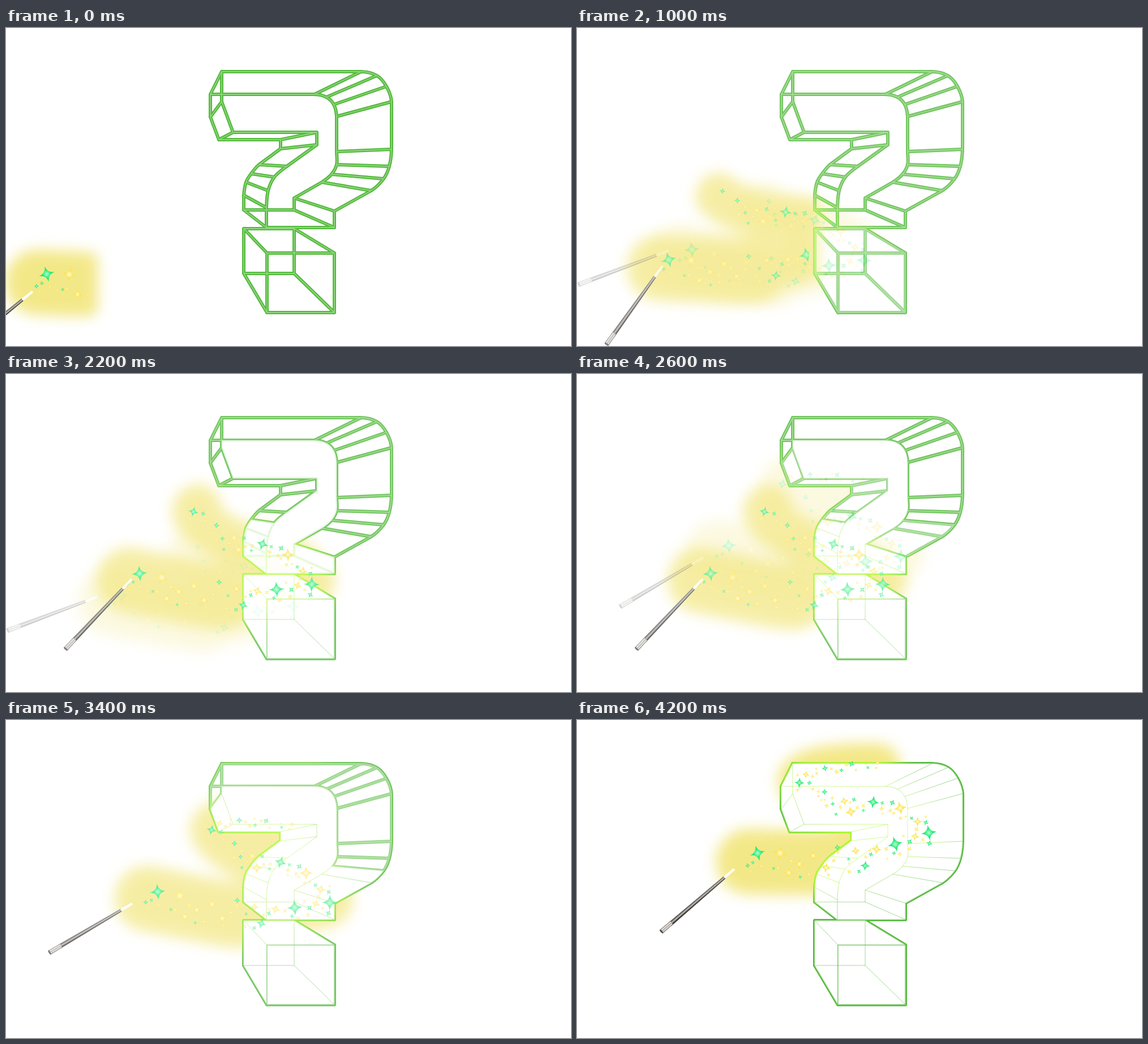
Animation of 998x561 px, one loop 4.4 s. Source, as an HTML page with a canvas:

```html
<!DOCTYPE html>
<html lang="en">
<head>
<meta charset="utf-8">
<title>Magic wand</title>
<style>
html, body { margin: 0; width: 100%; height: 100%; overflow: hidden; background: #fff; }
canvas { display: block; }
</style>
</head>
<body>
<canvas id="stage" width="998" height="561"></canvas>
<script>
const W = 998, H = 561, STEP = 200, STEPS = 22;
const stage = document.getElementById('stage').getContext('2d');

// Each row joins a corner of the large face to its twin on the small face
const CORNERS = [
  [381, 77, 361, 117], [627, 77, 545, 117], [655, 84, 566, 122], [672, 103, 579, 135], [681, 130, 584, 156],
  [681, 214, 584, 218], [677, 244, 584, 241], [667, 266, 575, 258], [645, 287, 558, 272], [580, 323, 509, 300],
  [580, 352, 509, 321], [460, 352, 420, 321], [460, 317, 420, 295], [463, 287, 424, 272], [474, 263, 433, 257],
  [496, 244, 447, 241], [549, 206, 485, 213], [549, 184, 485, 197], [401, 184, 376, 197], [381, 130, 361, 157]
];
const COUNT = CORNERS.length;
const makeFace = k => CORNERS.map((row, i) => ({ x: row[k], y: row[k + 1], i, k }));
const large = makeFace(0), small = makeFace(2);
const run = (face, from, to) => face.slice(from, to + 1);

// True when the edge after corner i is rounded
const isRound = i => (i > 0 && i < 4) || (i > 4 && i < 8) || (i > 11 && i < 15);

function tangent(p, size) {
  const face = p.k ? small : large;
  const a = face[(p.i + COUNT - 1) % COUNT], b = face[(p.i + 1) % COUNT];
  const scale = size / 3 / Math.hypot(b.x - a.x, b.y - a.y);
  return [(b.x - a.x) * scale, (b.y - a.y) * scale];
}

function outline(points) {
  const path = new Path2D();
  points.forEach((p, n) => {
    const q = points[n - 1];
    if (!q) return path.moveTo(p.x, p.y);
    if (q.k !== p.k || p.i !== q.i + 1 || !isRound(q.i)) return path.lineTo(p.x, p.y);
    const size = Math.hypot(p.x - q.x, p.y - q.y), [ax, ay] = tangent(q, size), [bx, by] = tangent(p, size);
    path.bezierCurveTo(q.x + ax, q.y + ay, p.x - bx, p.y - by, p.x, p.y);
  });
  path.closePath();
  return path;
}

const square = (l, t, r, b) => [[l, t], [r, t], [r, b], [l, b]].map(([x, y]) => ({ x, y, i: -1, k: x }));
const boxFront = square(461, 397, 580, 502), boxBack = square(420, 354, 509, 433);
const FRONT = outline(boxFront);
const WIRE = new Path2D();
[large, small, boxFront, boxBack].forEach(points => WIRE.addPath(outline(points)));
function joinFaces(a, b) {
  a.forEach((p, i) => {
    WIRE.moveTo(p.x, p.y);
    WIRE.lineTo(b[i].x, b[i].y);
  });
}
joinFaces(large, small);
joinFaces(boxFront, boxBack);

// Parts that have already turned solid
const crossing = { x: 381, y: 117, i: -1, k: -1 };
const box = outline([...run(boxBack, 0, 1), ...run(boxFront, 1, 3), boxBack[3]]);
const stem = outline([crossing, ...run(small, 1, 9), ...run(large, 9, 11), ...run(small, 11, 14), ...run(large, 14, 19)]);
const body = outline([small[19], large[19], crossing, ...run(small, 1, 7), ...run(large, 7, 11), ...run(small, 11, 18)]);
const whole = outline([...run(large, 0, 11), ...run(small, 11, 19), small[0]]);

function solidPath(parts) {
  const path = new Path2D();
  parts.forEach(part => path.addPath(part));
  return path;
}

// Centre line of the stardust
const TRAIL = [
  [236, 312], [300, 325], [390, 342], [450, 345], [515, 335], [572, 318], [530, 276],
  [480, 262], [430, 246], [390, 222], [366, 193], [395, 180], [450, 182], [505, 191]
];
const TRAIL_END = TRAIL.length - 1;

function trailAt(u) {
  const i = Math.min(Math.floor(u), TRAIL_END - 1), t = u - i;
  const p = n => TRAIL[Math.max(0, Math.min(TRAIL_END, i + n))];
  return [0, 1].map(d => {
    const a = p(-1)[d], b = p(0)[d], c = p(1)[d], e = p(2)[d];
    return b + t / 2 * (c - a + t * (2 * a - 5 * b + 4 * c - e + t * (3 * (b - c) + e - a)));
  });
}

// x, y, radius; a negative radius means green
const BIG_STARS = [
  [268, 303, -14], [307, 310, 13], [316, 347, 9], [337, 335, 9], [364, 325, 9], [382, 350, 9], [439, 330, 8],
  [451, 359, -9], [476, 334, 9], [510, 331, -14], [547, 324, 8], [572, 322, -14], [556, 299, 9], [530, 270, 12],
  [485, 251, -11], [443, 261, 10], [435, 240, 8], [363, 194, -9], [377, 182, 7], [412, 177, -6]
];
const ANCHOR = BIG_STARS[0];

function random(seed) {
  return () => (seed = seed * 16807 % 2147483647) / 2147483647;
}

function nearestOnTrail(x, y) {
  let best = 0, least = Infinity;
  for (let u = 0; u <= TRAIL_END; u += 0.1) {
    const [a, b] = trailAt(u), d = Math.hypot(a - x, b - y);
    if (d < least) [least, best] = [d, u];
  }
  return best;
}

function buildStars() {
  const rnd = random(91), small = 84;
  const list = BIG_STARS.map(([x, y, r]) => (
    { x, y, r: Math.abs(r), green: r < 0, tilt: rnd() * 0.5 - 0.1, u: nearestOnTrail(x, y) }));
  for (let i = 0; i < small; i++) {
    const u = (i + rnd()) / small * TRAIL_END, [cx, cy] = trailAt(u);
    const green = i % 3 === 0, r = green ? 3.5 + rnd() * 2.5 : 2.2 + rnd() * 3;
    const spread = u < 3 ? 24 : u < 10 ? 15 : 7;
    for (let tries = 0; tries < 8; tries++) {
      const x = cx + (rnd() * 2 - 1) * spread, y = cy + (rnd() * 2 - 1) * spread;
      if (list.some(s => Math.hypot(s.x - x, s.y - y) < (s.r + r) * 0.85)) continue;
      list.push({ x, y, r, green, tilt: rnd(), u });
      break;
    }
  }
  return list;
}
const stars = buildStars();

// at: leading star; wand: tip x, y and slope in degrees; last: visible length of the trail
const POSES = [
  { at: [72, 434], turn: -0.16, wand: [47, 465, -39], last: 1.35, glowEdge: 162, solid: [] },
  { at: [162, 409], turn: -0.152, wand: [151, 420, -54.4], last: 9.6, starEdge: 410, glowEdge: 430, solid: [] },
  { at: [203, 391], turn: 0, wand: [162, 393, -20.5], last: 8.9, solid: [box] },
  { at: [236, 352], turn: 0, wand: [222, 362, -46.5], last: 10.4, solid: [box, stem] },
  { at: [268, 303], turn: 0, wand: [223, 324, -30.5], last: TRAIL_END, solid: [box, body] },
  { at: [319, 235], turn: -0.181, wand: [278, 263, -40.5], last: TRAIL_END, solid: [box, whole] }
];

function layer() {
  const canvas = document.createElement('canvas');
  canvas.width = W;
  canvas.height = H;
  return canvas.getContext('2d');
}

function place(c, pose) {
  c.translate(...pose.at);
  c.rotate(pose.turn);
  c.translate(-ANCHOR[0], -ANCHOR[1]);
}

function clipRight(c, edge) {
  if (!edge) return;
  c.beginPath();
  c.rect(-200, -200, edge + 200, H + 400);
  c.clip();
}

function blurred(source, radius) {
  const c = layer();
  c.filter = `blur(${radius}px)`;
  c.drawImage(source.canvas, 0, 0);
  return c;
}

function glowShape(pose) {
  const c = layer();
  clipRight(c, pose.glowEdge);
  place(c, pose);
  c.lineCap = c.lineJoin = 'round';
  c.strokeStyle = '#f3e888';
  const sweep = (from, to, width) => {
    c.lineWidth = width;
    c.beginPath();
    for (let u = from; u <= to; u += 0.05) c.lineTo(...trailAt(u));
    c.stroke();
  };
  sweep(0.3, Math.min(pose.last, 2.4), 115);
  sweep(2.3, pose.last, 82);
  return c;
}

function wireLayer(solid, glow) {
  const c = layer();
  c.lineJoin = c.lineCap = 'round';
  const draw = (path, color, width) => {
    c.strokeStyle = color;
    c.lineWidth = width;
    c.stroke(path);
  };
  draw(WIRE, '#54b93d', 6);
  draw(WIRE, '#8ed57d', 1.8);
  c.globalCompositeOperation = 'destination-out';
  c.fill(solid);
  c.globalCompositeOperation = 'source-over';
  c.save();
  c.clip(solid);
  c.globalAlpha = 0.55;
  draw(WIRE, '#58b844', 1);
  draw(FRONT, '#58b844', 1.6);
  c.restore();

  // Lines near the glow turn lime
  const tint = blurred(glow, 18);
  tint.filter = 'none';
  tint.globalCompositeOperation = 'source-in';
  tint.fillStyle = '#b9ff35';
  tint.fillRect(0, 0, W, H);
  c.globalCompositeOperation = 'source-atop';
  c.globalAlpha = 0.9;
  c.drawImage(tint.canvas, 0, 0);
  return c;
}

function drawStar(c, s) {
  c.save();
  c.translate(s.x, s.y);
  c.rotate(s.tilt);
  const shade = c.createRadialGradient(0, 0, 0, 0, 0, s.r);
  const colors = s.green ? ['#b5ffd2', '#25ec79', '#10dc5c'] : ['#fffce2', '#ffe552', '#ffdf38'];
  colors.forEach((color, i) => shade.addColorStop(i / 2, color));
  c.fillStyle = shade;
  c.beginPath();
  c.moveTo(s.r, 0);
  for (let k = 1; k <= 4; k++) {
    const a = k * Math.PI / 2, mid = a - Math.PI / 4, waist = s.r * 0.16;
    c.quadraticCurveTo(Math.cos(mid) * waist, Math.sin(mid) * waist, Math.cos(a) * s.r, Math.sin(a) * s.r);
  }
  c.fill();
  c.restore();
}

function drawStars(c, pose) {
  c.save();
  clipRight(c, pose.starEdge);
  place(c, pose);
  stars.filter(s => s.u <= pose.last).forEach(s => drawStar(c, s));
  c.restore();
}

function drawWand(c, [x, y, slope]) {
  const length = 170, half = d => 4.2 - 1.9 * d / length;
  const piece = (from, to, colors) => {
    const g = c.createLinearGradient(0, -4, 0, 4);
    colors.forEach((color, i) => g.addColorStop(i / (colors.length - 1), color));
    c.fillStyle = g;
    c.beginPath();
    c.moveTo(from, -half(from));
    c.lineTo(to, -half(to));
    c.lineTo(to, half(to));
    c.lineTo(from, half(from));
    c.fill();
  };
  c.save();
  c.translate(x, y);
  c.rotate(slope * Math.PI / 180);
  c.translate(-length, 0);
  piece(20, length - 22, ['#5a5652', '#6b6763', '#c9c6c2', '#3f3b38', '#35312e']);
  piece(0, 24, ['#6d6863', '#f3f1ee', '#a9a49f', '#ebe8e4', '#5c5752']);
  piece(length - 23, length, ['#d9d3b4', '#fffdf0', '#ffffff', '#fff7d2', '#b9b295']);
  c.fillStyle = '#56514d';
  c.beginPath();
  c.ellipse(0.5, 0, 1.6, 4.2, 0, 0, 7);
  c.fill();
  c.restore();
}

// magic: strength of the glow, the stars and the wand
function renderPose(pose, magic = 1) {
  const c = layer(), glow = glowShape(pose), solid = solidPath(pose.solid);
  c.globalAlpha = magic;
  c.drawImage(blurred(glow, 12).canvas, 0, 0);
  c.globalAlpha = 1;
  c.fillStyle = '#fff';
  c.fill(solid);
  c.drawImage(wireLayer(solid, glow).canvas, 0, 0);
  c.globalAlpha = magic;
  drawStars(c, pose);
  drawWand(c, pose.wand);
  return c.canvas;
}

const pictures = POSES.map(pose => renderPose(pose));
const bare = renderPose(POSES[5], 0);
const appearing = renderPose(POSES[5], 0.5);

function show(picture, alpha) {
  stage.globalAlpha = alpha;
  stage.drawImage(picture, 0, 0);
}

function frame(now) {
  const step = Math.floor(now / STEP) % STEPS;
  stage.globalAlpha = 1;
  stage.fillStyle = '#fff';
  stage.fillRect(0, 0, W, H);
  if (step >= 20) return show(step === 20 ? appearing : pictures[5], 1);
  const k = Math.floor(step / 4), mix = step % 4 / 4;
  show(pictures[k], 1 - mix);
  if (mix) show(k === 4 ? bare : pictures[k + 1], mix);
}

const start = performance.now();
function loop() {
  frame(performance.now() - start);
  requestAnimationFrame(loop);
}
loop();
</script>
</body>
</html>
```
